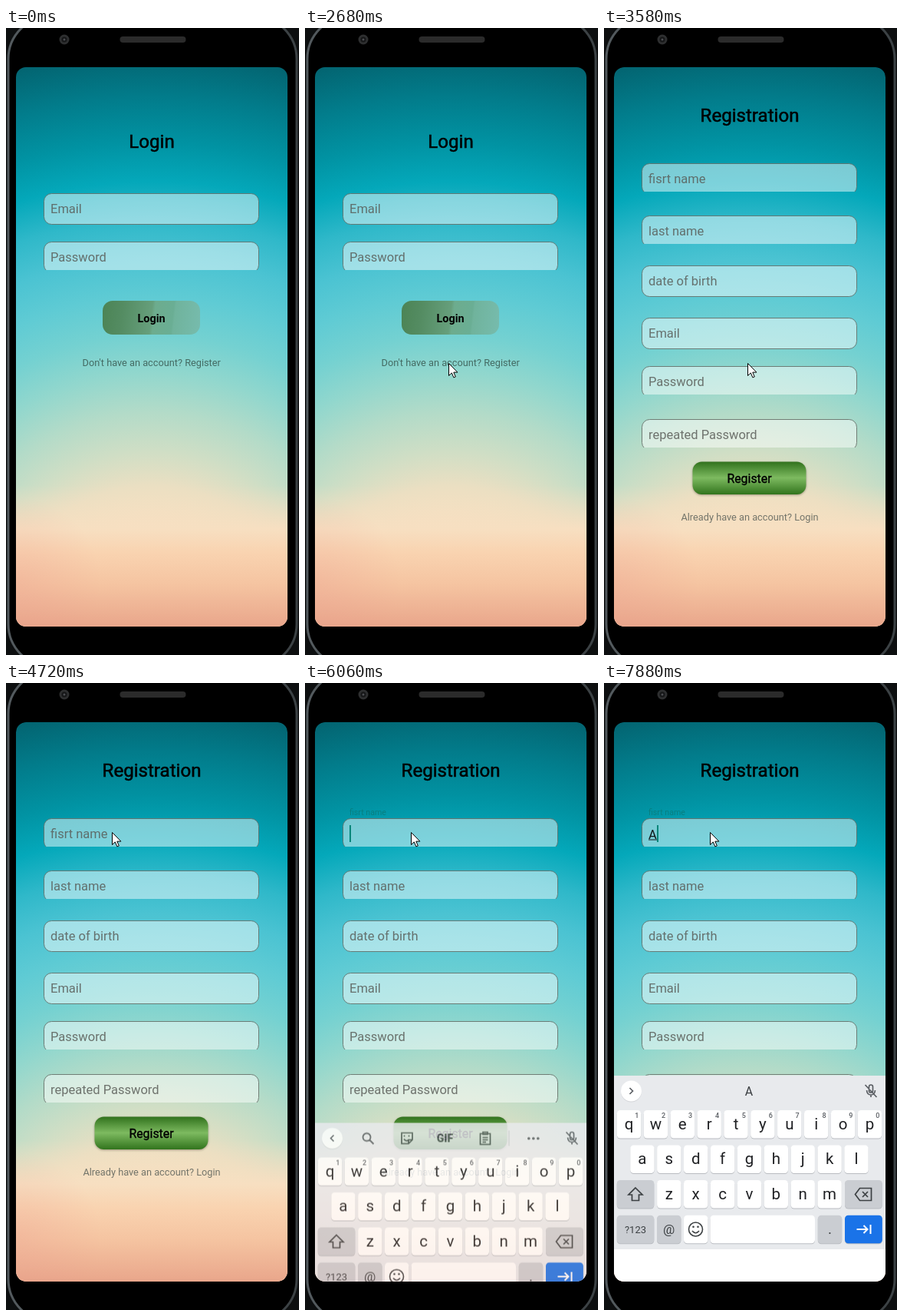
These frames come from a looping animation (382 px wide and 816 px high, 8000 ms). An HTML page with a canvas:

```html
<!DOCTYPE html>
<html lang="en">
<head>
<meta charset="utf-8">
<title>Sign up flow</title>
<style>
  html, body { margin: 0; width: 100%; height: 100%; overflow: hidden; background: #000; }
  canvas { display: block; width: 382px; height: 816px; }
</style>
</head>
<body>
<canvas id="stage"></canvas>
<script>
const W = 382, H = 816, LOOP = 8000;
const dpr = window.devicePixelRatio || 1;
const stage = document.getElementById('stage');
const FONT = 'Roboto, "Noto Sans", sans-serif';
const HINT = 'rgba(88,90,86,.84)', ICON = '#5b5f64';

function sized(canvas) {
  canvas.width = W * dpr;
  canvas.height = H * dpr;
  const c = canvas.getContext('2d');
  c.scale(dpr, dpr);
  return c;
}
const main = sized(stage);
const layer = document.createElement('canvas');
const keys = sized(layer);
let g = main;

// ---- helpers ----
const lerp = (a, b, k) => a + (b - a) * k;
const smooth = k => k * k * (3 - 2 * k);

// Progress that jumps n times, first at a and last at b
function hops(t, a, b, n) {
  if (t < a) return 0;
  if (t >= b) return 1;
  return (Math.floor((t - a) / (b - a) * (n - 1) + 1e-6) + 1) / n;
}

function rr(x, y, w, h, r) {
  g.beginPath();
  g.roundRect(x, y, w, h, r);
}

function box(x, y, w, h, r, fill) {
  rr(x, y, w, h, r);
  g.fillStyle = fill;
  g.fill();
}

function text(s, x, y, size, color, weight = 400, align = 'left') {
  g.font = `${weight} ${size}px ${FONT}`;
  g.textAlign = align;
  g.fillStyle = color;
  g.fillText(s, x, y);
}

// Medium weight: regular glyphs thickened by a hairline
function medium(s, x, y, size) {
  text(s, x, y, size, '#000', 400, 'center');
  g.lineWidth = size * .022;
  g.strokeStyle = '#000';
  g.strokeText(s, x, y);
}

function ramp(grad, stops) {
  stops.forEach(([p, c]) => grad.addColorStop(p, c));
  return grad;
}

function icon(d, x, y, width = 1.7, color = ICON) {
  g.save();
  g.translate(x, y);
  g.lineWidth = width;
  g.strokeStyle = color;
  g.stroke(new Path2D(d));
  g.restore();
}

// ---- phone and sky ----
function phone() {
  g.fillStyle = '#0d0f10';
  g.fillRect(0, 0, W, H);
  rr(3, -15.5, 376, 847, 56);
  g.fillStyle = '#000';
  g.fill();
  g.lineWidth = 3;
  g.strokeStyle = ramp(g.createLinearGradient(0, 0, W, 0),
    [[0, '#545b5f'], [.5, '#3a3f42'], [1, '#3c4245']]);
  g.stroke();
  box(148.5, 11, 86, 8, 4, '#2b2b2b');
  box(69.5, 8.5, 13, 13, 6.5, '#2e2f30');
  box(72.5, 11.5, 7, 7, 3.5, '#151617');
  box(74.5, 13.5, 3, 3, 1.5, '#4b4d50');
}

function sky() {
  const R = 770;
  const at = r => r / R;
  g.fillStyle = ramp(g.createRadialGradient(190, 790, 0, 190, 790, R), [
    [at(150), '#f6e0c2'], [at(195), '#eadfc2'], [at(240), '#cfdec5'],
    [at(290), '#b3dbc8'], [at(340), '#92d7cd'], [at(390), '#74d1d1'],
    [at(440), '#5fcbd4'], [at(490), '#4bc3d2'], [at(540), '#2fb8c9'],
    [at(590), '#04a8ba'], [at(640), '#0193a3'], [at(700), '#027c8b'], [1, '#035f6b']
  ]);
  g.fillRect(13, 51, 354, 728);
  g.fillStyle = ramp(g.createLinearGradient(0, 595, 0, 779), [
    [0, 'rgba(240,223,194,0)'], [.31, '#f7dfc1'], [.48, '#f9d3b0'],
    [.7, '#f5c4a1'], [1, '#e9a68b']
  ]);
  g.fillRect(13, 595, 354, 184);
  g.fillStyle = ramp(g.createRadialGradient(13, 720, 0, 13, 720, 110),
    [[0, 'rgba(232,150,140,.26)'], [1, 'rgba(232,150,140,0)']]);
  g.fillRect(13, 605, 120, 174);
}

// h is the visible height; short fields lose their bottom edge
function field(hint, y, h = 37) {
  g.save();
  g.beginPath();
  g.rect(48, y - 1, 284, h + 1);
  g.clip();
  rr(49.5, y + .5, 280, 40, 10);
  g.fillStyle = 'rgba(255,255,255,.48)';
  g.fill();
  g.lineWidth = 1;
  g.strokeStyle = 'rgba(98,108,100,.85)';
  g.stroke();
  g.restore();
  if (hint) text(hint, 58, y + 26, 16.5, HINT);
}

// ---- pages ----
function loginPage() {
  sky();
  medium('Login', 190, 155.5, 24.1);
  field('Email', 215, 42);
  field('Password', 278);
  box(126, 355, 127, 44, 13, ramp(g.createLinearGradient(126, 370, 252, 385), [
    [0, '#4c8456'], [.2, '#548c62'], [.5, '#669f7c'], [.53, '#6dac8e'],
    [.72, '#6aae94'], [.74, '#70b39c'], [1, '#76bbac']
  ]));
  text('Login', 189.5, 382.5, 14.4, '#000', 700, 'center');
  text("Don't have an account? Register", 189.7, 439.5, 12.75, 'rgba(56,88,80,.85)', 400, 'center');
}

function registerPage(t) {
  sky();
  medium('Registration', 190, 121.5, 24.1);
  field('', 176);
  field('last name', 244);
  field('date of birth', 309, 42);
  field('Email', 377, 42);
  field('Password', 440);
  field('repeated Password', 509);
  g.save();
  g.shadowColor = 'rgba(60,60,40,.45)';
  g.shadowBlur = 3 * dpr;
  g.shadowOffsetY = dpr;
  box(115.5, 564.5, 148, 42.5, 12, ramp(g.createLinearGradient(0, 564, 0, 607),
    [[0, '#2f701b'], [.5, '#7dba60'], [1, '#32741d']]));
  g.restore();
  medium('Register', 189.5, 591.5, 15.9);
  text('Already have an account? Login', 190, 641, 12.75, 'rgba(92,98,90,.85)', 400, 'center');

  const up = smooth(hops(t, 5120, 5380, 4));
  text('fisrt name', 58, lerp(202, 172, up), lerp(16.5, 10.6, up), up > .5 ? '#087f80' : HINT);
  const typed = t >= 7610;
  if (typed) text('A', 58, 202.5, 16.5, '#10181a');
  if (t >= 7810) box(58, 203.5, 11, 1, 0, '#10181a');
  const caretOn = (t >= 5190 && t < 6260) || (t >= 6810 && t < 7210) || typed;
  if (caretOn) box(typed ? 69 : 58, 185, 2, 22, 0, '#00867a');
}

// ---- keyboard ----
const PITCH = 34.88, KEY = 31.4;

function key(x, y, w, color = '#fff') {
  box(x, y + 1, w, 36.5, 4.5, '#b9bcc1');
  box(x, y, w, 36.5, 4.5, color);
}

function row(letters, x, y, digits) {
  [...letters].forEach((ch, i) => {
    const kx = x + i * PITCH;
    key(kx, y, KEY);
    text(ch, kx + KEY / 2, y + 24.5, 20.5, '#202124', 400, 'center');
    if (digits) text(digits[i], kx + 26, y + 10, 9, ICON, 500, 'center');
  });
}

function tools() {
  icon('M2 -4L-2 0L2 4', 35.5, 531);
  icon('M3.5 -1.5A5 5 0 1 1 -6.5 -1.5A5 5 0 1 1 3.5 -1.5M2 2L7.5 7.5', 82, 531, 1.9);
  icon('M-7 -7H7V2L2 7H-7ZM2 7V2H7M-4 1Q-1 5 2 2', 133, 531);
  box(128.5, 527, 2, 2, 1, ICON);
  box(134.5, 527, 2, 2, 1, ICON);
  text('GIF', 182.5, 536, 14, ICON, 900, 'center');
  icon('M-6.5 -6H6.5V8H-6.5ZM-3 -8H3V-5H-3ZM-3.5 -1H3.5M-3.5 2H3.5M-3.5 5H1', 235, 531);
  box(265.5, 521, 1, 20, 0, '#c4c7cb');
  for (let i = -1; i < 2; i++) box(296 + i * 6, 529.5, 3.6, 3.6, 1.8, ICON);
}

function suggestions() {
  icon('M-2 -4L2 0L-2 4', 35.5, 531);
  text('A', 189, 537, 16, '#3c4043', 400, 'center');
}

function keyboard(swap) {
  g = keys;
  g.clearRect(0, 0, W, H);
  box(13, 511, 354, 226, 0, '#e8eaed');
  box(13, 737, 354, 42, 0, '#fff');
  box(22, 518.5, 27, 27, 13.5, '#d3d5d9');
  box(22, 517.5, 27, 27, 13.5, '#fff');
  g.globalAlpha = 1 - swap;
  if (swap < 1) tools();
  g.globalAlpha = swap;
  if (swap > 0) suggestions();
  g.globalAlpha = 1;
  icon('M-2.5 -5.5Q-2.5 -8 0 -8Q2.5 -8 2.5 -5.5V0Q2.5 2 0 2Q-2.5 2 -2.5 0ZM-5.5 -1Q-5 5 0 5Q5 5 5.5 -1M0 5V8M-7.5 -8L7.5 8', 348, 531);

  const grey = '#cacdd2', left = 16.8, dark = '#3c4043';
  row('qwertyuiop', left, 556, '1234567890');
  row('asdfghjkl', left + PITCH / 2, 601.5);
  row('zxcvbnm', left + PITCH * 1.5, 647);

  key(left, 647, 48.5, grey);
  icon('M0 -9L9 0H4.5V7.5H-4.5V0H-9Z', 41, 666, 1.7, dark);
  key(314, 647, 48.8, grey);
  icon('M-10.5 0L-4.5 -8H10.5V8H-4.5ZM-1 -3.5L6 3.5M6 -3.5L-1 3.5', 338, 665.5, 1.7, dark);

  const y = 692.8;
  key(left, y, 48.5, grey);
  text('?123', 41, y + 23.5, 13, dark, 400, 'center');
  key(69, y, KEY, grey);
  text('@', 84.7, y + 24, 17, dark, 400, 'center');
  key(104, y, KEY);
  icon('M9 0A9 9 0 1 1 -9 0A9 9 0 1 1 9 0M-4.5 2Q0 7.5 4.5 2', 119.5, 711, 1.6, dark);
  box(115.2, 706.5, 2.6, 2.6, 1.3, dark);
  box(121.2, 706.5, 2.6, 2.6, 1.3, dark);
  key(138.5, y, 136.5);
  key(278.8, y, KEY, grey);
  text('.', 294.5, y + 24.5, 19, dark, 400, 'center');
  key(314, y, 48.8, '#1a73e8');
  icon('M-9 0H5M0 -5L5 0L0 5M9 -6V6', 338.5, 711, 2, '#fff');
  g = main;
}

// ---- pointer ----
// start, end, hops, destination
const MOVES = [
  [250, 250, 1, 353, 752], [315, 510, 4, 266, 487], [1370, 1370, 1, 265, 483],
  [1440, 2140, 11, 187, 442], [2210, 2280, 2, 187, 436], [4230, 4720, 8, 138, 194]
];

function pointer(t) {
  if (t < 250) return;
  let x = 353, y = 752;
  for (const [a, b, n, tx, ty] of MOVES) {
    const k = smooth(hops(t, a, b, n));
    x = lerp(x, tx, k);
    y = lerp(y, ty, k);
  }
  const tapped = (t >= 2480 && t < 2680) || (t >= 4920 && t < 5120);
  if (tapped) {
    box(x - 12, y - 12, 24, 24, 12, ramp(g.createRadialGradient(x, y, 0, x, y, 12),
      [[0, 'rgba(255,255,255,.5)'], [.8, 'rgba(240,240,240,.4)'], [1, 'rgba(120,120,120,.3)']]));
  }
  g.save();
  g.translate(Math.round(x) + .5, Math.round(y) + .5);
  const arrow = new Path2D('M0 0V16L3.8 12.4L6.4 18.4L8.8 17.4L6.3 11.6H11.4Z');
  g.fillStyle = '#fff';
  g.fill(arrow);
  g.lineWidth = 1;
  g.strokeStyle = '#000';
  g.stroke(arrow);
  g.restore();
}

// ---- frame ----
function screenClip() {
  rr(13, 51, 354, 728, 13);
  g.clip();
}

function draw(t) {
  phone();
  g.save();
  screenClip();
  if (t < 3440) {
    loginPage();
  } else {
    // The new page grows over the dimmed old one
    const grow = 1 - .0045 * (1 - hops(t, 3440, 3580, 3));
    if (grow < 1) {
      loginPage();
      g.fillStyle = 'rgba(0,0,0,.4)';
      g.fillRect(0, 0, W, H);
    }
    g.save();
    g.translate(190, 415);
    g.scale(grow, grow);
    g.translate(-190, -415);
    screenClip();
    registerPage(t);
    g.restore();
  }
  if (t >= 6060) {
    const k = hops(t, 6060, 6260, 4);
    keyboard(hops(t, 7810, 7880, 2));
    g.globalAlpha = 1 - .225 * (1 - k);
    g.drawImage(layer, 0, 61.5 * ((1 - k) / .75) ** 2, W, H);
    g.globalAlpha = 1;
  }
  g.restore();
  pointer(t);
}

const begin = performance.now();
function tick() {
  draw((performance.now() - begin) % LOOP);
  requestAnimationFrame(tick);
}
tick();
</script>
</body>
</html>
```
